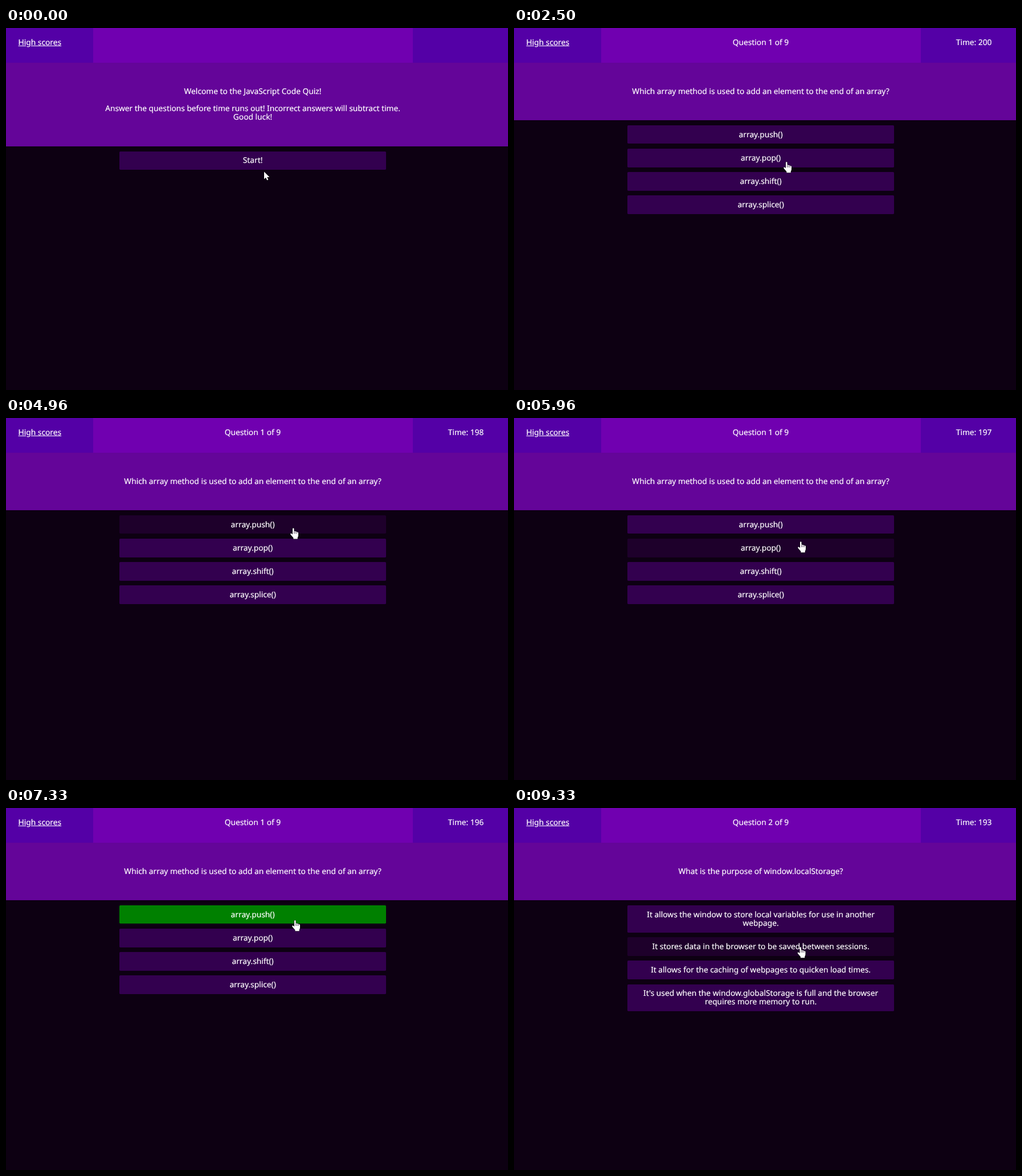
These frames come from a looping animation (881x636 px, 9.7 s). An HTML page:

```html
<!DOCTYPE html>
<html lang="en">
<head>
<meta charset="utf-8">
<title>Code Quiz</title>
<style>
  html, body { margin: 0; width: 100%; height: 100%; overflow: hidden; background: #0d0012; }
  #stage {
    position: relative; width: 881px; height: 636px; overflow: hidden;
    background: #0d0012; color: #fff;
    font: 13.76px/15.22px "Noto Sans", sans-serif;
    text-rendering: geometricPrecision; -webkit-text-stroke: .2px #fff;
  }
  header { position: relative; height: 60.55px; background: #5400a6; }
  header > * { position: absolute; top: 18.4px; }
  #scores { left: 21.6px; text-decoration: underline; }
  #middle { left: 153px; top: 0; width: 561px; height: 100%; background: #7000b0; }
  #count { left: 0; width: 866px; text-align: center; }
  #time { left: 775.8px; }
  #question, .answer { white-space: pre; text-align: center; }
  #question { padding: 43.25px 15px 43.25px 0; background: #640599; }
  .answer {
    margin: 8.65px 0 0 199.3px; width: 467.6px; padding: 8.65px 0;
    box-sizing: border-box; border-radius: 1.7px;
  }
  svg { position: absolute; left: 0; top: 0; overflow: visible; }
  .shape { fill: #fff; stroke: #000; stroke-width: 1; paint-order: stroke; stroke-linejoin: round; }
  .lines { fill: none; stroke: #1a0026; stroke-width: .7; }
</style>
</head>
<body>
<div id="stage">
  <header>
    <div id="middle"></div>
    <div id="scores">High scores</div>
    <div id="count"></div>
    <div id="time"></div>
  </header>
  <div id="question"></div>
  <div id="answers"></div>
  <svg id="cursor" width="20" height="22">
    <path id="arrow" class="shape" d="M0 0V13L3 10.3L5.2 15L7.3 14.1L5.2 9.5H9.4Z"/>
    <g id="hand">
      <path class="shape" d="M4 1.5a1.25 1.3 0 0 1 2.5 0V5.6q1.2-.5 2.2.5q1.3-.4 2.2.6q1.2-.2 1.6.6q1.3 0 1.5 1.4V13q0 2-1.3 4V19.2H5.4V17.3L.8 12Q-.3 10.3.8 9.6Q1.9 9 4 11.2Z"/>
      <path class="lines" d="M6.6 6V10M9 6.6V10M11.4 7.2V10"/>
    </g>
  </svg>
</div>
<script>
const LOOP = 9700, FADE = 300, STEP = 90;
const BASE = [51, 0, 79], HOVER = [30, 0, 43], RIGHT = [0, 128, 0];
const CLOCK_START = 2524, SECOND = 966;

const SCENES = [
  { from: 0, count: "",
    text: "Welcome to the JavaScript Code Quiz!\n\nAnswer the questions before time runs out! Incorrect answers will subtract time.\nGood luck!",
    answers: ["Start!"] },
  { from: 2500, count: "Question 1 of 9",
    text: "Which array method is used to add an element to the end of an array?",
    answers: ["array.push()", "array.pop()", "array.shift()", "array.splice()"] },
  { from: 7980, count: "Question 2 of 9",
    text: "What is the purpose of window.localStorage?",
    answers: [
      "It allows the window to store local variables for use in another\nwebpage.",
      "It stores data in the browser to be saved between sessions.",
      "It allows for the caching of webpages to quicken load times.",
      "It's used when the window.globalStorage is full and the browser\nrequires more memory to run."] }
];

// pointer moves; "leaves" is the answer left behind for its neighbour
const MOVES = [
  { first: 0, last: 0, x: 453, y: 252.5 },
  { first: 90, last: 90, x: 418, y: 230 },
  { first: 180, last: 180, x: 473, y: 235 },
  { first: 3970, last: 4600, x: 500, y: 182, leaves: 1 },
  { first: 4870, last: 5500, x: 496, y: 227, leaves: 0 },
  { first: 5780, last: 6500, x: 502, y: 197, leaves: 1 },
  { first: 8520, last: 9060, x: 499, y: 238, leaves: 0 },
  { first: 9240, last: 9330, x: 497.5, y: 244 }
];

const mix = (a, b, p) => a + (b - a) * p;
const $ = id => document.getElementById(id);

const fades = [
  { at: 360, answer: 0, to: HOVER, span: 1 },
  { at: 2590, answer: 1, to: HOVER, span: 1 },
  { at: 7000, answer: 0, to: RIGHT },
  { at: 8030, answer: 0, to: HOVER }
];
for (const { first, last, leaves } of MOVES) {
  if (leaves === undefined) continue;
  fades.push({ at: mix(first, last, .28), answer: leaves, to: BASE });
  fades.push({ at: mix(first, last, .55), answer: 1 - leaves, to: HOVER });
}
fades.sort((a, b) => a.at - b.at);

// the CSS "ease" curve
function ease(x) {
  let lo = 0, hi = 1;
  for (let i = 0; i < 20; i++) {
    const u = (lo + hi) / 2;
    if (.75 * u * (1 - u) + u ** 3 < x) lo = u; else hi = u;
  }
  return .3 * lo * (1 - lo) ** 2 + 3 * lo * lo * (1 - lo) + lo ** 3;
}

function colour(answer, t) {
  let c = BASE;
  for (const f of fades) {
    if (f.answer !== answer || f.at < scene.from || f.at > t) continue;
    const p = ease(Math.min(1, (t - f.at + (f.span ? 1 : 0)) / (f.span || FADE)));
    c = c.map((v, i) => mix(v, f.to[i], p));
  }
  return `rgb(${c.map(Math.round)})`;
}

// moves advance in whole steps, the first one at once
function pointer(t) {
  const i = MOVES.findLastIndex(m => m.first <= t);
  const to = MOVES[i], from = MOVES[i - 1] || to;
  const total = Math.round((to.last - to.first) / STEP) + 1;
  const done = Math.floor((t - to.first) / STEP) + 1;
  const p = Math.min(1, done / total);
  return { x: mix(from.x, to.x, p), y: mix(from.y, to.y, p), isArrow: i === 0 };
}

let scene;
function show(next) {
  scene = next;
  $("count").textContent = scene.count;
  $("question").textContent = scene.text;
  $("answers").replaceChildren(...scene.answers.map(text => {
    const box = document.createElement("div");
    box.className = "answer";
    box.textContent = text;
    return box;
  }));
}

function draw(t) {
  const next = SCENES.findLast(s => s.from <= t);
  if (next !== scene) show(next);
  const seconds = Math.max(0, Math.floor((t - CLOCK_START) / SECOND));
  $("time").textContent = scene.count && `Time: ${200 - seconds}`;
  [...$("answers").children].forEach((box, i) => { box.style.background = colour(i, t); });
  const { x, y, isArrow } = pointer(t);
  $("cursor").style.transform = `translate(${x}px, ${y}px)`;
  $("arrow").style.display = isArrow ? "" : "none";
  $("hand").style.display = isArrow ? "none" : "";
}

const begin = performance.now();
function loop() {
  draw((performance.now() - begin) % LOOP);
  requestAnimationFrame(loop);
}
loop();
</script>
</body>
</html>
```
